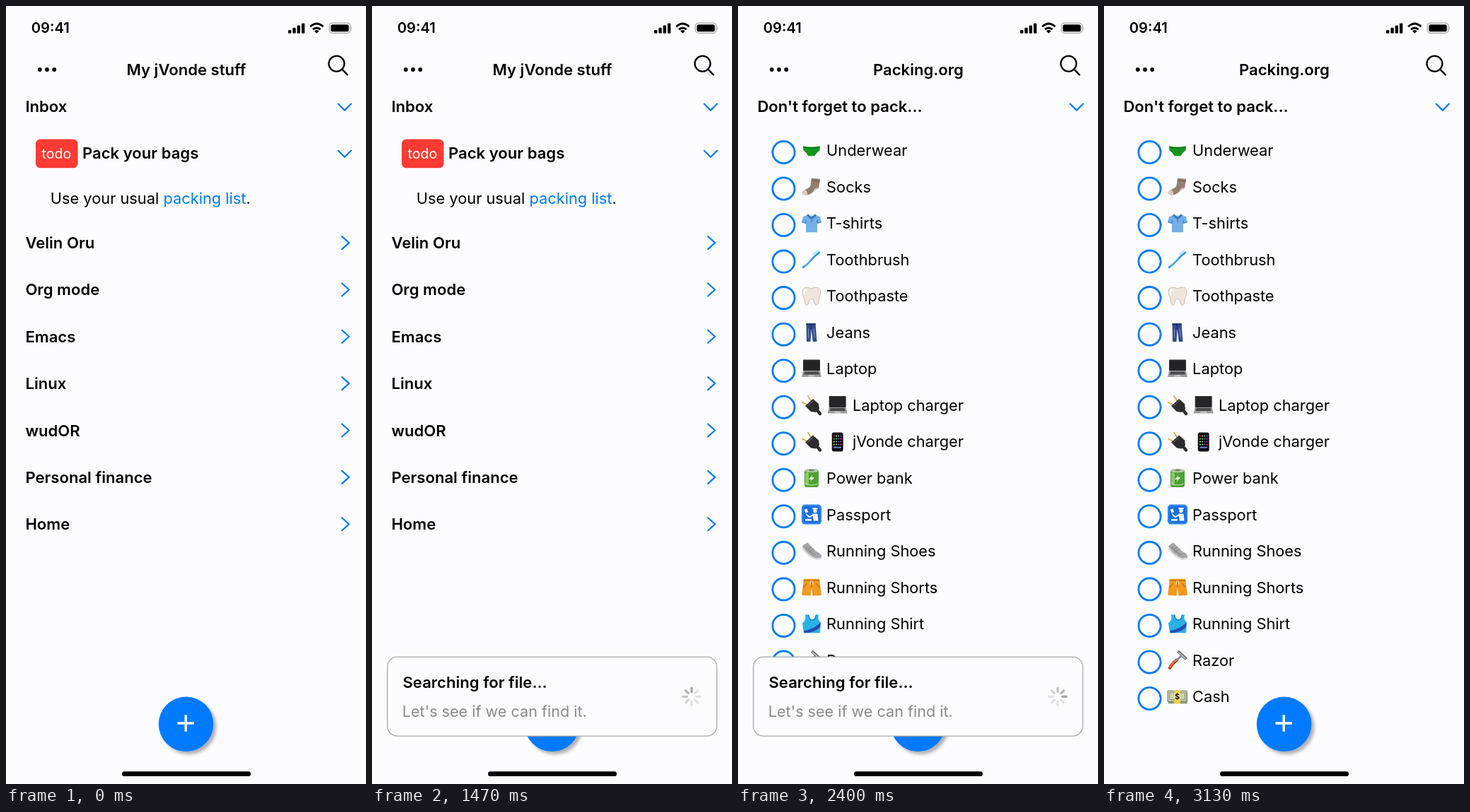
Write an HTML page that moves like this. It is 509x1101 px and loops after 3670 ms.

```html
<!DOCTYPE html>
<html lang="en">
<head>
<meta charset="utf-8">
<style>
html, body { margin: 0; width: 100%; height: 100%; overflow: hidden; background: #fcfcfe; }
svg { display: block; width: 100vw; height: 100vh; }
text { font: 400 21.8px Inter, "Liberation Sans", sans-serif; white-space: pre; }
.b { font-weight: 600; font-size: 22.1px; }
.line { fill: none; stroke: #007aff; stroke-width: 2.2; stroke-linecap: round; stroke-linejoin: round; }
</style>
</head>
<body>
<svg id="stage" viewBox="0 0 509 1101"></svg>
<script>
const LOOP = 3670, BLUE = '#007aff', BG = '#fcfcfe';
const LOAD = 2100, OPEN = 2310;

const path = (fill, d) => `<path fill="${fill}" d="${d}"/>`;
const stroke = (color, w, d, cap = 'round') =>
  `<path fill="none" stroke="${color}" stroke-width="${w}" stroke-linecap="${cap}" stroke-linejoin="round" d="${d}"/>`;
const box = (x, y, w, h, r, fill, more = '') =>
  `<rect x="${x}" y="${y}" width="${w}" height="${h}" rx="${r}" fill="${fill}" ${more}/>`;
const text = (x, y, s, more = '') => `<text x="${x}" y="${y}" ${more}>${s}</text>`;
const bold = (x, y, s, more = '') => text(x, y, s, 'class="b" ' + more);
const group = (id, body) => `<g id="${id}">${body}</g>`;
const times = (n, f) => Array.from({ length: n }, (_, i) => f(i)).join('');

// Each icon fills a 28 x 28 cell.
const icons = {
  briefs: path('#16931f', 'M2 8Q14 10.5 26 8L25.5 14Q21 17 18.5 22H9.5Q7 17 2.5 14Z') +
    stroke('#0c6f18', 1.2, 'M3 9.3Q14 11.8 25 9.3'),
  sock: path('#907e72', 'M14 2L26 3 24 16Q19 19 14 23Q7 28 2 25Q-1 20 7 17Q13 15 13 9Z') +
    path('#dccbbd', 'M2 25Q-1 20 5 18Q9 21 8 26Q4 27 2 25ZM24 15Q18 15 16 21Q21 18 24 15Z') +
    stroke('#6f5f55', 1.4, 'M14.5 5L25.5 6'),
  shirt: path('#74afe8', 'M9 2L2 5 0 13 6 15V27H22V15L28 13 26 5 19 2Q14 5 9 2Z') +
    path('#3b77bd', 'M9 1L14 6 19 1 21 3 16 8H12L7 3Z') +
    stroke('#3b77bd', 1, 'M14 8V13M0.5 12L6 14V10M27.5 12L22 14V10'),
  brush: stroke('#2c98dc', 2.6, 'M2 25Q8 21 13 15T25 4') +
    stroke('#bfe6f8', 3, 'M17 6L23 1.5') + stroke('#8ed2f5', 1, 'M4 23Q9 19 14 13'),
  tooth: `<g stroke="#cbbdab">${path('#eee6da',
    'M14 4C19 0 27 1 27 8C27 13 24 15 24 20C24 25 22 28 20 27C17 26 19 18 14 18C9 18 11 26 8 27C6 28 4 25 4 20C4 15 1 13 1 8C1 1 9 0 14 4Z')}</g>` +
    stroke('#fff', 2, 'M6 5Q3 7 4 11'),
  jeans: path('#35498f', 'M6.5 1H19.5L21.5 27H15.8L13.7 9 12.5 27H7Z') +
    stroke('#1f2c63', 1.5, 'M7 2.5H19.5M13.2 3V9') + stroke('#7c90cc', 1.2, 'M9.5 9V21M17 9L18.5 21'),
  laptop: box(2, 1, 24, 16, 1, '#2b2b2d') + box(3.5, 2.5, 21, 13, 0, '#242426') +
    path('#9b9b9f', 'M2 17H26L28 25.5H0Z') + path('#4a4a4d', 'M4 18H24L25 22H3Z') +
    path('#c4c4c7', 'M10 22.8H18L18.5 25H9.5Z'),
  plug: stroke('#d3b45c', 2, 'M1 10L9 14M9 1L14 9') + path('#2c2c2e', 'M5 15L16 5 24 12 25 19 20 24 13 23Z') +
    stroke('#2c2c2e', 4.4, 'M22 21L26 26') + stroke('#5b5b5e', 1.3, 'M8 15L16 8'),
  phone: box(6, 1, 16, 27, 3, '#161618') + box(7.5, 4, 13, 21, 0.5, '#000') +
    times(16, i => `<circle cx="${9.2 + i % 4 * 3.2}" cy="${6 + (i >> 2) * 4}" r="1.15" fill="hsl(${i * 97} 80% 58%)"/>`) +
    box(8.5, 21, 11, 2.5, 1, '#5a78b0'),
  battery: box(4, 2, 20, 25, 3, '#4f9f36') + box(5, 6, 5, 18, 2, '#86cc62') +
    '<ellipse cx="14" cy="3.4" rx="10" ry="2.8" fill="#b6c8a8"/><ellipse cx="14" cy="3" rx="4" ry="1.3" fill="#728668"/>' +
    stroke('#c9efb4', 1, 'M5 22Q14 26 23 22') + path('#e2ffd2', 'M16 9L10 16H14L12 20 18 13H14Z'),
  passport: box(0, 0, 28, 28, 5, '#1a6fe0') + box(1.2, 1.2, 25.6, 25.6, 4, 'none', 'stroke="#4c9bf5"') +
    '<circle cx="19" cy="9" r="2.6" fill="#fff"/>' + path('#fff', 'M15.5 4.5H22.5V6.8H15.5ZM15 13H22.5L23.5 23H17Z') +
    stroke('#fff', 1.8, 'M15.5 15L10.5 17.5 6.5 13.5') + box(4.5, 6.5, 4, 5, 0.5, '#fff', 'transform="rotate(-20 6 9)"') +
    box(5, 20.5, 9, 2.4, 0, '#fff'),
  shoe: path('#a5a4a8', 'M1 7L8 2 14 8 21 15Q28 17 28 23Q27 27 20 26L3 13Z') +
    stroke('#dddce0', 2.4, 'M2 11Q9 22 21 25.8L26.5 24.5') + stroke('#77767b', 1, 'M10 11L14 8M13 14L17 11M5 8L9 13 19 20'),
  shorts: path('#f19a1e', 'M3 2H25L28 25 15.5 26 14 14 12.5 26 0 25Z') +
    stroke('#b96b0c', 1.3, 'M3 4.5H25M14 5V14M3 14L7 9M25 14L21 9') + stroke('#fff0c8', 1, 'M13 5L12 10M15 5L16 10'),
  vest: path('#26b2e5', 'M5 1H10Q10 8 16 8Q20 6 20 1H24Q22 8 27 12L26 27H3L1 13Q7 9 5 1Z') +
    path('#254bb0', 'M26.7 12L26 19Q17 27 4 27L3 24Q17 22 26.7 12Z') + stroke('#1878b8', 1.2, 'M10 2Q10.5 9 16 9Q20 7 20 2'),
  razor: stroke('#b73c17', 4.4, 'M3 25Q8 17 13 14') + stroke('#ec7434', 2, 'M3 24Q8 16.5 13 13.5') +
    stroke('#85878b', 2.6, 'M13 14L19 8') + path('#6c6f74', 'M13 3L16 0 28 11 25 14Z') +
    stroke('#d7dade', 1.2, 'M15.5 3L25 11.7'),
  cash: box(1, 9, 27, 15, 0, '#8c9579') + box(0, 6, 27, 15, 0, '#c8ceb1', 'stroke="#747d62"') +
    box(2.5, 8.5, 22, 10, 0, 'none', 'stroke="#8c9579"') + box(9, 5, 9, 19, 0, '#ecd24c') +
    '<circle cx="13.5" cy="13.5" r="5" fill="#f4e7a0"/>' +
    text(13.5, 17.6, '$', 'text-anchor="middle" style="font-size:11px;font-weight:600"')
};

const right = y => `<path class="line" d="M475 ${y - 9}L485 ${y}L475 ${y + 9}"/>`;
const down = y => `<path class="line" d="M469.7 ${y - 3.8}L478.8 ${y + 5.3}L487.9 ${y - 3.8}"/>`;
const heading = (y, s, open) => bold(27.4, y + 8, s) + (open ? down(y + 0.6) : right(y));
const title = s => bold(254.9, 97.5, s, 'text-anchor="middle"');

const topics = ['Velin Oru', 'Org mode', 'Emacs', 'Linux', 'wudOR', 'Personal finance', 'Home'];
const topicList = y0 => topics.map((s, i) => heading(y0 + i * 66.35, s)).join('');

const items = [
  ['briefs', 'Underwear'], ['sock', 'Socks'], ['shirt', 'T-shirts'], ['brush', 'Toothbrush'],
  ['tooth', 'Toothpaste'], ['jeans', 'Jeans'], ['laptop', 'Laptop'], ['plug laptop', 'Laptop charger'],
  ['plug phone', 'jVonde charger'], ['battery', 'Power bank'], ['passport', 'Passport'],
  ['shoe', 'Running Shoes'], ['shorts', 'Running Shorts'], ['vest', 'Running Shirt'],
  ['razor', 'Razor'], ['cash', 'Cash']
];
const item = ([names, label], i) => {
  const y = 204.3 + i * 51.53, list = names.split(' ');
  return `<circle cx="64.5" cy="${y + 2.7}" r="15.6" fill="none" stroke="${BLUE}" stroke-width="2.8"/>` +
    list.map((n, k) => `<g transform="translate(${90 + k * 36.7} ${y - 14})">${icons[n]}</g>`).join('') +
    text(88.3 + list.length * 36.8, y + 7.9, label);
};

const spinner = (id, x, y) => `<g id="${id}" transform="translate(${x} ${y})">` +
  times(8, i => `<path d="M0 -6.7V-12" stroke="#3c3c43" stroke-width="3.3" stroke-linecap="round" transform="rotate(${i * 45})"/>`) + '</g>';

const status = text(35.8, 38.3, '09:41', 'style="font-size:20.2px;font-weight:600"') +
  times(4, i => box(399 + i * 6.3, 34 - i * 3.2, 4.4, 4.8 + i * 3.2, 1.2, '#000')) +
  stroke('#000', 2.9, 'M430.2 29.2Q439.3 20.8 448.4 29.2M434 33.2Q439.3 28.6 444.6 33.2', 'butt') +
  path('#000', 'M436 35.4Q439.3 32.8 442.6 35.4L439.3 38.8Z') +
  box(457.2, 24.2, 29.6, 14.2, 4.3, 'none', 'stroke="#a5a5a8" stroke-width="1.3"') +
  box(459.3, 26.3, 25.4, 10, 2.6, '#000') + path('#a5a5a8', 'M488 29Q490 31.3 488 33.8Z');

const dots = times(3, i => `<circle cx="${47.8 + i * 10.2}" cy="90" r="2.9"/>`);
const search = stroke('#000', 2.3, 'M456.4 81.6A11 11 0 1 0 478.4 81.6A11 11 0 1 0 456.4 81.6M475.2 89.6L482.8 97.4');
const fab = `<circle cx="254.6" cy="1016.3" r="38.8" fill="${BLUE}" filter="url(#shadow)"/>` +
  stroke('#fff', 3.4, 'M242.4 1015H266M254.2 1003.2V1026.8', 'butt');

const stage = document.getElementById('stage');
stage.innerHTML =
  '<defs><filter id="shadow" x="-20%" y="-20%" width="150%" height="150%"><feDropShadow dx="4" dy="4" stdDeviation="2" flood-opacity=".3"/></filter></defs>' +
  status + dots +
  group('home', title('My jVonde stuff') + heading(141.7, 'Inbox', true) +
    box(42, 188.5, 59.5, 40.8, 6.5, '#ff3b34') + text(50.5, 215.6, 'todo', 'fill="#fff" style="font-size:19.6px"') +
    bold(108, 216, 'Pack your bags') + down(208.5) +
    text(62.8, 280, `Use your usual <tspan fill="${BLUE}">packing list</tspan>.`) + topicList(335.1)) +
  group('loading', title('My jVonde stuff') + heading(141.7, 'Inbox') + topicList(208) + spinner('navSpin', 473.7, 89.7)) +
  group('packing', title('Packing.org') + heading(141.7, "Don't forget to pack...", true) + items.map(item).join('')) +
  group('tools', search + fab) +
  group('toast', box(21.7, 921.2, 465.8, 111.9, 14, BG, 'stroke="#a9a9ac" stroke-width="1.3"') +
    bold(43.5, 965.3, 'Searching for file...') +
    text(42.8, 1006, "Let's see if we can find it.", 'fill="#8a8a8f" style="font-size:21.6px"') +
    spinner('toastSpin', 452, 977.3)) +
  box(164, 1083.3, 182, 6.8, 3.4, '#000');

const $ = id => document.getElementById(id);
const show = (id, on) => $(id).style.display = on ? '' : 'none';
const ramp = (t, a, b) => {
  const k = Math.min(1, Math.max(0, (t - a) / (b - a)));
  return k * k * (3 - 2 * k);
};

// The leading spoke jumps one place clockwise every 99 ms, with a fading trail.
function spin(id, elapsed) {
  const lead = Math.floor(elapsed / 99);
  [...$(id).children].forEach((spoke, i) => {
    const age = ((lead - i) % 8 + 8) % 8;
    spoke.style.opacity = 0.14 + 0.32 * Math.max(0, 1 - age / 4);
  });
}

function draw(now) {
  const t = now % LOOP;
  show('home', t < LOAD);
  show('loading', t >= LOAD && t < OPEN);
  show('packing', t >= OPEN);
  show('tools', t < LOAD || t >= OPEN);
  $('toast').style.opacity = ramp(t, 430, 640) - ramp(t, 2560, 2730);
  spin('toastSpin', t - 604);
  spin('navSpin', t - 1580);
}

const start = performance.now();
function tick() {
  draw(performance.now() - start);
  requestAnimationFrame(tick);
}
tick();
</script>
</body>
</html>
```
